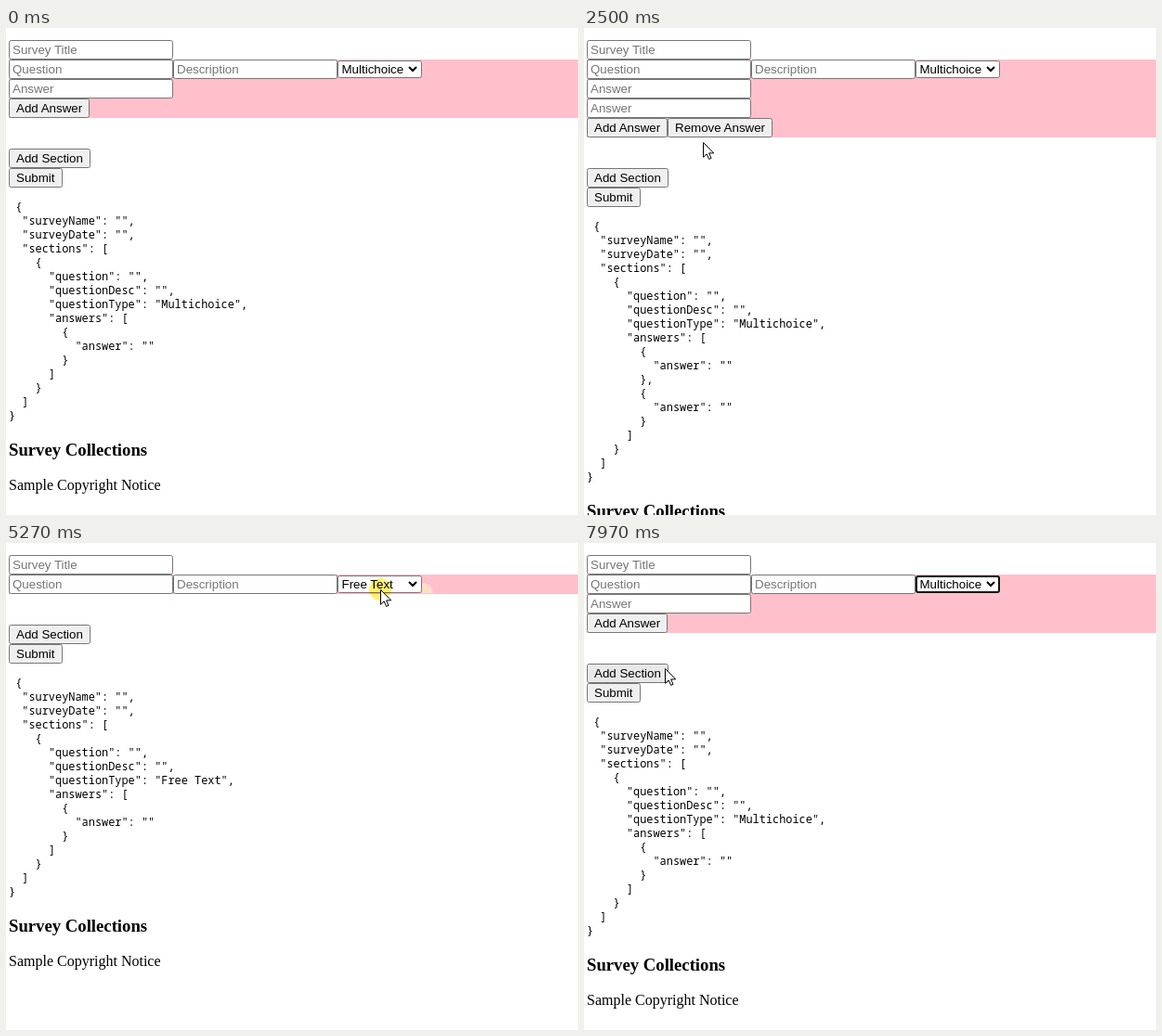
An HTML page that plays this animation: 616x525 px, repeating every 8 s.

```html
<!DOCTYPE html>
<html lang="en">
<head>
<meta charset="utf-8">
<title>Survey builder</title>
<style>
html, body { margin: 0; width: 100%; height: 100%; overflow: hidden; background: #fff; }
svg { display: block; width: 616px; height: 525px; }
text { white-space: pre; }
.ui { font: 13.333px "Liberation Sans", Arial, sans-serif; }
.code { font: 11.91px "Noto Sans Mono", monospace; }
.head { font: bold 18.72px "Liberation Serif", "Times New Roman", serif; }
.body { font: 16px "Liberation Serif", "Times New Roman", serif; }
.press { mix-blend-mode: multiply; }
.menu { filter: drop-shadow(0 2px 4px rgba(0, 0, 0, .4)); }
</style>
</head>
<body>
<svg viewBox="0 0 616 525">
  <g id="page"></g>
  <g id="popup"></g>
  <circle id="press" class="press" r="12" fill="#ffec50" opacity=".8"/>
  <path id="arrow" d="M.5 .5V16.3L4.2 12.8 6.6 18.4 9 17.4 6.6 11.9H11.7Z" fill="#fff" stroke="#000"/>
  <path id="beam" d="M-3 -7.5H-1L0 -6.5 1 -7.5H3M0 -6.5V6.5M-3 7.5H-1L0 6.5 1 7.5H3" fill="none" stroke="#000"/>
</svg>
<script>
const LOOP = 8000, ENTER = 280;
const ROW = 21, TOP = 13, LEFT = 3, OPTION = 16.5, LINE = 15, CHAR = 7.147;
const HOLD = 70; // how long a press lasts
const TYPES = ["Multichoice", "Free Text", "True/False"];

const $ = id => document.getElementById(id);
const clamp = u => Math.max(0, Math.min(1, u));
const ease = u => u * u * (3 - 2 * u);

// Script steps: each one updates the state s for time t.
const go = (end, x, y, ms) => (s, t) => {
  const dx = x - s.x, dy = y - s.y;
  const span = ms || 38 * Math.sqrt(Math.hypot(dx, dy));
  const k = ease(clamp((t - end + span) / span));
  s.x += dx * k;
  s.y += dy * k;
};
const press = (at, act) => (s, t) => {
  const age = t - at;
  if (age < 0) return;
  if (age < HOLD) s.down = true;
  act(s, age);
};
const add = (s, age) => { if (age >= HOLD) s.count++; };
const remove = (s, age) => { if (age >= HOLD) s.count--; };
const open = (s, age) => { if (age >= 40) s.menu = age; };
const pick = type => (s, age) => {
  if (age >= HOLD) Object.assign(s, { type, menu: 0, focus: type === 0 });
};
const optionY = i => 65 + 15 * i;

const SCRIPT = [
  go(760, 59, 87, 450), press(840, add), go(1030, 61, 87),
  go(1230, 57, 101), press(1490, add),
  go(2090, 128, 123), press(2430, remove),
  go(2770, 126, 105, 70), press(3030, remove),
  go(3780, 391, 47), press(3840, open),
  go(4110, 391, optionY(0) + 2), go(4360, 400, optionY(1)), press(4390, pick(1)),
  go(5200, 403, 50), press(5240, open),
  go(5670, 400, optionY(2)), press(5750, pick(2)),
  go(6580, 400, 51), press(6735, open),
  go(7080, 402, optionY(0)), press(7110, pick(0)),
  go(7960, 87, 135, 330)
];

function stateAt(t) {
  const s = { x: 220, y: 525, type: 0, count: 1, menu: 0, down: false, focus: false };
  SCRIPT.forEach(step => step(s, t));
  s.shown = t >= ENTER;
  s.rows = s.type ? 0 : s.count;
  return s;
}

const rect = (x, y, w, h, fill, extra = "") =>
  `<rect x="${x}" y="${y}" width="${w}" height="${h}" fill="${fill}" ${extra}/>`;
const text = (cls, x, y, s, fill = "#000") =>
  `<text class="${cls}" x="${x}" y="${y}" fill="${fill}">${s}</text>`;
const box = (x, y, w, h, fill) =>
  rect(x + .5, y + .5, w - 1, h - 1, fill, 'rx="2" stroke="#767676"');
const input = (x, y, label) =>
  box(x, y, 177, ROW, "#fff") + text("ui", x + 4, y + 15, label, "#757575");

function button(s, x, y, w, label) {
  const hover = s.shown && s.x >= x && s.x < x + w && s.y >= y && s.y < y + ROW;
  return box(x, y, w, ROW, hover ? "#e8e8e8" : "#efefef") + text("ui", x + 8, y + 15, label);
}

function select(s) {
  const frame = s.focus
    ? rect(358, 36, 89, 17, "#fff", 'rx="2" stroke="#101010" stroke-width="2"')
    : box(357, 35, 91, 19, "#fff");
  return frame + text("ui", 361.5, 49, TYPES[s.type]) +
    '<path d="M434 42L438 46 442 42" fill="none" stroke="#000" stroke-width="2"/>';
}

function surveyLines({ type, count }) {
  const values = type === 2 ? ["True", "False"] : Array(count).fill("");
  const survey = {
    surveyName: "",
    surveyDate: "",
    sections: [{
      question: "",
      questionDesc: "",
      questionType: TYPES[type],
      answers: values.map(answer => ({ answer }))
    }]
  };
  return (" " + JSON.stringify(survey, null, 2)).split("\n");
}

function page(s) {
  const second = TOP + ROW;
  let y = second + ROW;
  let out = rect(LEFT, second, 613, ROW * (s.rows ? s.rows + 2 : 1), "#ffc0cb") +
    input(LEFT, TOP, "Survey Title") + input(LEFT, second, "Question") +
    input(180, second, "Description");
  if (s.down && s.type === 1 && !s.menu)
    out += '<path d="M448 43Q458 43 460 54H448Z" fill="#ffddc4"/>';
  out += select(s);
  for (let i = 0; i < s.rows; i++, y += ROW) out += input(LEFT, y, "Answer");
  if (s.rows) {
    out += button(s, LEFT, y, 87, "Add Answer");
    if (s.rows > 1) out += button(s, 90, y, 113, "Remove Answer");
    y += ROW;
  }
  y += 33;
  out += button(s, LEFT, y, 88, "Add Section") + button(s, LEFT, y + ROW, 58, "Submit");
  y += 67;
  for (const line of surveyLines(s)) {
    const code = line.trimStart();
    out += text("code", LEFT + CHAR * (line.length - code.length), y, code);
    y += LINE;
  }
  return out + text("head", LEFT, y + 24, "Survey Collections") +
    text("body", LEFT, y + 61, "Sample Copyright Notice");
}

function popup(s) {
  if (!s.menu) return "";
  let out = rect(357, 54, 91, 52, "#fff", 'class="menu"');
  if (s.menu < 100) return out;
  out += rect(357.5, 54.5, 90, 51, "#fff", 'stroke="#c4c4c4"');
  const active = s.y < 55 ? s.type : Math.floor((s.y - 55) / OPTION);
  TYPES.forEach((name, i) => {
    const y = 55 + OPTION * i;
    if (i === active) out += rect(358, y, 89, OPTION, "#1e90ff");
    out += text("ui", 361.5, y + 12, name, i === active ? "#fff" : "#000");
  });
  return out;
}

function overInput({ x, y, rows, menu }) {
  const line = Math.floor((y - TOP) / ROW);
  const right = line === 1 ? 357 : 180;
  return !menu && x >= LEFT && x < right && line >= 0 && line < 2 + rows;
}

const cache = {};
function put(id, html) {
  if (cache[id] !== html) $(id).innerHTML = cache[id] = html;
}

function place(id, shown, x, y) {
  $(id).setAttribute("visibility", shown ? "visible" : "hidden");
  $(id).setAttribute("transform", `translate(${x} ${y})`);
}

function draw(t) {
  const s = stateAt(t);
  const x = Math.round(s.x), y = Math.round(s.y);
  const typing = overInput(s);
  put("page", page(s));
  put("popup", popup(s));
  place("press", s.down, x, y);
  place("arrow", s.shown && !typing, x, y);
  place("beam", s.shown && typing, x + .5, y + .5);
}

function tick() {
  draw(performance.now() % LOOP);
  requestAnimationFrame(tick);
}
tick();
</script>
</body>
</html>
```
